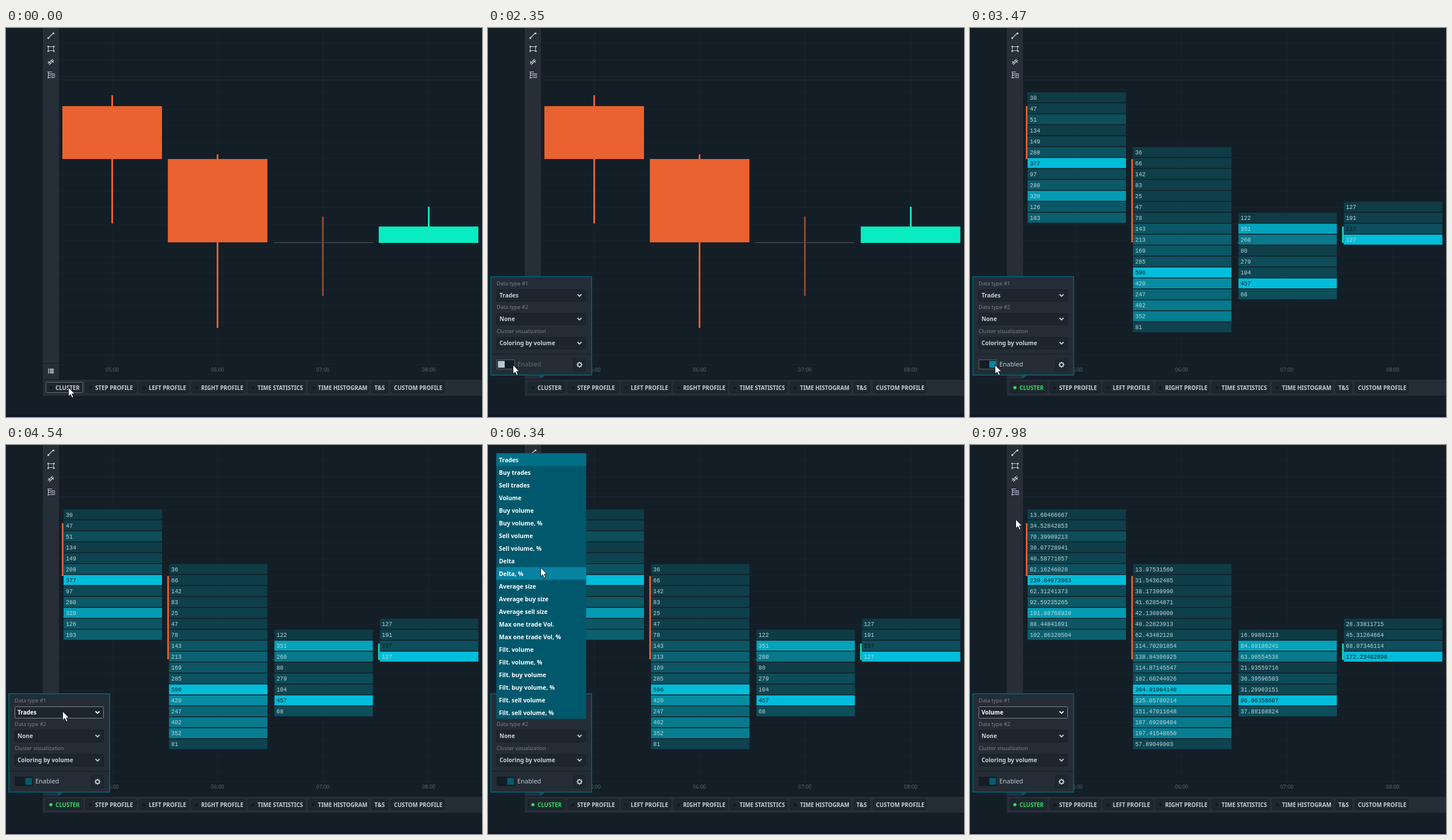
An HTML page with a canvas that plays this animation: 827x677 px, repeating every 8000 ms.

```html
<!DOCTYPE html>
<html lang="en">
<head>
<meta charset="utf-8">
<title>Cluster chart</title>
<style>
html, body { margin: 0; width: 100%; height: 100%; overflow: hidden; background: #141e27; }
canvas { display: block; }
</style>
</head>
<body>
<canvas id="stage" width="827" height="677"></canvas>
<script>
const ctx = document.getElementById('stage').getContext('2d');
const LOOP = 8000;
const STEP = 19.04;
const SANS = '"Noto Sans", "Open Sans", sans-serif';
const MONO = '10px "Liberation Mono", monospace';
const ORANGE = '#ea6230', TEAL = '#09ecc1';

// Rows start `first` steps below the top of the cluster grid.
const columns = [
  { x: 100, first: 0,
    trades: '30 47 51 134 149 208 377 97 280 320 126 103',
    volume: '13.60466667 34.52842853 70.39909213 30.07728941 48.58771057 82.16246028 230.84973063 62.31241373 92.59235265 191.08768920 88.44841091 102.86320504' },
  { x: 283.2, first: 5,
    trades: '36 66 142 83 25 47 78 143 213 169 285 596 420 247 402 352 81',
    volume: '13.97531560 31.54362485 38.17399990 41.62854871 42.13089000 40.22823913 62.43482128 114.70201854 138.84306925 114.87145547 102.60244926 304.01964140 225.05789214 151.47011648 187.69209404 197.41548650 57.89049003' },
  { x: 466.4, first: 11,
    trades: '122 351 260 80 279 104 457 68',
    volume: '16.99801213 84.69189241 63.90554538 21.93559716 36.39596503 31.29903151 96.06358697 37.88168824' },
  { x: 649.6, first: 10,
    trades: '127 191 237 127',
    volume: '28.33811715 45.31264664 68.07346114 172.23482890' }
].map(c => ({ ...c, trades: c.trades.split(' '), volume: c.volume.split(' ') }));

const candles = [
  { x: 98, top: 136, bottom: 228, high: 117, low: 340, color: ORANGE },
  { x: 281.2, top: 228, bottom: 373, high: 220, low: 522, color: ORANGE },
  { x: 464.4, top: 373, bottom: 374, high: 328, low: 466, color: '#565b5d', wick: '#8d4a30' },
  { x: 647.6, top: 345.5, bottom: 374, high: 311, low: 346, color: TEAL }
];

const buttons = [
  [69, 65, 'CLUSTER', 1], [138, 89, 'STEP PROFILE', 1], [231, 87, 'LEFT PROFILE', 1],
  [322, 94, 'RIGHT PROFILE', 1], [420, 100, 'TIME STATISTICS', 1], [525, 105, 'TIME HISTOGRAM', 1],
  [635, 29, 'T&S', 0], [669, 93, 'CUSTOM PROFILE', 0]
];

const options = ['Trades', 'Buy trades', 'Sell trades', 'Volume', 'Buy volume', 'Buy volume, %',
  'Sell volume', 'Sell volume, %', 'Delta', 'Delta, %', 'Average size', 'Average buy size',
  'Average sell size', 'Max one trade Vol.', 'Max one trade Vol, %', 'Filt. volume',
  'Filt. volume, %', 'Filt. buy volume', 'Filt. buy volume, %', 'Filt. sell volume',
  'Filt. sell volume, %'];

const easeBoth = p => p * p * (3 - 2 * p);
const easeIn = p => p ** 1.5;
const easeOut = p => 1 - (1 - p) ** 1.5;

// Pointer stops: time, x, y, easing on the way there.
const path = [
  [0, 108, 626], [915, 108, 626], [1620, 43, 586, easeBoth], [2349, 43, 586], [2350, 43, 587],
  [3510, 43, 587], [4190, 98, 455, easeBoth], [4270, 98, 455], [4540, 98, 464, easeBoth],
  [5780, 98, 464], [6340, 91, 215, easeIn], [6610, 85, 119, easeOut], [6640, 85, 119],
  [7120, 79, 92, easeBoth], [7890, 79, 92], [7980, 79, 130, easeBoth], [LOOP, 79, 130]
];

const ramp = (t, a, b) => Math.min(1, Math.max(0, (t - a) / (b - a)));
const mix = (a, b, p) => `rgb(${a.map((v, i) => Math.round(v + (b[i] - v) * p))})`;

function pointerAt(t) {
  const i = path.findIndex(k => k[0] > t);
  const [t0, x0, y0] = path[i - 1], [t1, x1, y1, ease = p => p] = path[i];
  const p = ease(ramp(t, t0, t1));
  return { x: Math.round(x0 + (x1 - x0) * p), y: Math.round(y0 + (y1 - y0) * p) };
}

function rect(x, y, w, h, color) {
  ctx.fillStyle = color;
  ctx.fillRect(x, y, w, h);
}

function frame(x, y, w, h, fill, border, line = 1, radius = 0) {
  ctx.beginPath();
  ctx.roundRect(x + line / 2, y + line / 2, w - line, h - line, radius);
  ctx.fillStyle = fill;
  ctx.fill();
  ctx.lineWidth = line;
  ctx.strokeStyle = border;
  ctx.stroke();
}

function label(str, x, y, color, font) {
  ctx.font = font;
  ctx.fillStyle = color;
  ctx.fillText(str, x, y);
}

const sans = (size, weight = 400) => `${weight} ${size}px ${SANS}`;

function stroke(d, color, width = 1) {
  ctx.strokeStyle = color;
  ctx.lineWidth = width;
  ctx.stroke(new Path2D(d));
}

function dot(x, y, r, color) {
  ctx.beginPath();
  ctx.arc(x, y, r, 0, 7);
  ctx.fillStyle = color;
  ctx.fill();
}

function drawGrid() {
  rect(0, 0, 827, 677, '#141e27');
  for (let k = 0; k < 20; k++) rect(92, Math.round(26.4 + 1.5 * STEP * k), 735, 1, '#19242c');
  rect(92, 90, 735, 1, '#1f2a33');
  rect(92, 585, 735, 1, '#19242c');
  ctx.textAlign = 'center';
  for (let k = 0; k < 4; k++) {
    const x = Math.round(184 + 183.2 * k);
    rect(x, 0, 1, 586, '#19242c');
    label(`0${5 + k}:00`, x + .5, 598, '#59656e', sans(9));
  }
  ctx.textAlign = 'left';
}

function drawSidebar() {
  const c = '#c0cbd4';
  rect(64, 0, 28, 611, '#262f38');
  rect(64, 583, 28, 1, '#141e27');
  stroke('M74 17L82 9', c, 1.2);
  rect(72, 16, 3, 3, c);
  rect(81, 8, 3, 3, c);
  stroke('M73.5 32.5H82.5V39.5H73.5Z', c);
  for (const x of [72, 82]) for (const y of [31, 39]) rect(x, y, 2.5, 2.5, c);
  stroke('M73 62L81 54M75 64L83 56M73 58l4 3M79 57l4 3', c, 1.2);
  stroke('M72 76.5H80M73.5 76V88M73 79.5H78M73 82.5H77M72 86.5H77', c);
  stroke('M78.5 79.5H84.5V86.5H78.5ZM80 82.5H83M81.5 80V86', '#b3a9d3');
  for (const y of [593, 596, 599]) {
    rect(73, y, 2, 2, c);
    rect(76, y, 7, 2, c);
  }
}

function drawCandles(clustered) {
  for (const { x, top, bottom, high, low, color, wick = color } of candles) {
    if (!clustered) rect(Math.round(x + 85), high, 3, low - high, wick);
    rect(x - (clustered ? 1 : 0), top, clustered ? 2.8 : 173, bottom - top, color);
  }
}

function drawClusters(key) {
  for (const col of columns) {
    const peak = Math.max(...col.volume), least = Math.min(...col.volume);
    const textPeak = Math.max(...col[key]);
    col.volume.forEach((v, i) => {
      const y = 112 + STEP * (col.first + i);
      const heat = ramp(v, least, peak) ** 1.45;
      rect(col.x, y, 171, 17.5, mix([15, 59, 69], [0, 189, 217], heat));
      const str = col[key][i];
      label(str, Math.round(col.x + 3.6), Math.round(y + 12.6),
        +str === textPeak ? '#0b1a20' : '#c3d3d9', MONO);
    });
  }
}

function drawButtons(t, p) {
  rect(64, 611, 763, 1, '#10181f');
  rect(64, 612, 763, 28, '#252e37');
  rect(0, 673, 827, 4, '#10172a');
  const green = ramp(t, 2600, 2960);
  buttons.forEach(([x, w, text, hasDot], i) => {
    const hover = p.y > 616 && p.y < 635 && p.x > x && p.x < x + w;
    const lit = i ? 0 : green;
    frame(x, 616, w, 19, '#1e272f', hover ? '#66717a' : '#151e26', 1, 2);
    if (hasDot) dot(x + 9, 626, 2.8, mix([18, 26, 33], [44, 222, 94], lit));
    label(text, x + (hasDot ? 17 : 5), 629.5, mix([195, 206, 215], [44, 222, 94], lit), sans(9.75, 700));
  });
}

function drawSelect(y, caption, value, active) {
  label(caption, 15, y - 7, '#7a838a', sans(9.15));
  frame(15, y, 155, 21, '#1d262f', active ? '#7d8890' : '#151e26', 1, 1);
  const c = active ? '#ffffff' : '#c6d0d8';
  label(value, 20, y + 14, c, sans(10, 600));
  stroke(`M155.5 ${y + 8.5}l3.5 3.5l3.5 -3.5`, c, 1.8);
}

function drawGear(x, y) {
  const c = '#c0cbd4';
  ctx.beginPath();
  ctx.arc(x, y, 3, 0, 7);
  ctx.lineWidth = 1.5;
  ctx.strokeStyle = c;
  ctx.stroke();
  for (let a = 0; a < 8; a++) {
    ctx.save();
    ctx.translate(x, y);
    ctx.rotate(a * Math.PI / 4);
    rect(-1, -5, 2, 2, c);
    ctx.restore();
  }
}

function drawPopup(t, p) {
  ctx.globalAlpha = ramp(t, 460, 790);
  ctx.fillStyle = '#05596a';
  ctx.fill(new Path2D('M87 604H99L93 610Z'));
  frame(4, 432, 177, 173, '#242d36', '#05596a', 2);
  rect(6, 567, 173, 1, '#161f27');
  drawSelect(455, 'Data type #1', t < 7100 ? 'Trades' : 'Volume', t > 4150);
  drawSelect(496, 'Data type #2', 'None');
  drawSelect(538, 'Cluster visualization', 'Coloring by volume');

  const hover = p.x < 95 && p.y > 576 && p.y < 594;
  const on = ramp(t, 2560, 2760);
  frame(15, 577, 32, 17, '#141d25', hover ? '#59656e' : '#172028');
  rect(17.3 + 16.2 * on, 579.5, 11.7, 11.7, mix([184, 198, 208], hover ? [8, 135, 161] : [4, 92, 110], on));
  label('Enabled', 51, 589, mix([98, 109, 117], [190, 201, 209], on), sans(10.9));
  frame(148, 575, 22, 22, '#1f2830', '#172028', 1, 1);
  drawGear(159, 586);
  ctx.globalAlpha = 1;
}

function drawOptions(t, p) {
  ctx.globalAlpha = ramp(t, 5000, 5300) * (1 - ramp(t, 7260, 7450));
  const top = 14.5, row = 22;
  const chosen = t < 7090 ? 0 : 3;
  const hovered = Math.floor((p.y - top) / row);
  rect(14.5, top, 156, row * options.length, '#00586c');
  options.forEach((text, i) => {
    const y = top + row * i;
    if (i === chosen) rect(14.5, y, 156, row, '#007088');
    else if (i === hovered) rect(14.5, y, 156, row, '#0782a0');
    label(text, 19, y + 15, '#ffffff', sans(10.3, 600));
  });
  ctx.globalAlpha = 1;
}

function drawPointer({ x, y }) {
  ctx.save();
  ctx.translate(x + .5, y - .5);
  const arrow = new Path2D('M0 0V15.5L3.6 12.2L6.2 18L8.7 16.9L6.2 11.3H11Z');
  ctx.fillStyle = '#fff';
  ctx.fill(arrow);
  ctx.lineWidth = 1;
  ctx.strokeStyle = '#10161c';
  ctx.stroke(arrow);
  ctx.restore();
}

function draw(t) {
  const p = pointerAt(t);
  drawGrid();
  drawCandles(t >= 2650);
  if (t >= 3465) drawClusters(t < 7480 ? 'trades' : 'volume');
  drawSidebar();
  drawButtons(t, p);
  if (t > 500) drawPopup(t, p);
  if (t > 5040 && t < 7450) drawOptions(t, p);
  drawPointer(p);
}

const start = performance.now();
function tick() {
  draw((performance.now() - start) % LOOP);
  requestAnimationFrame(tick);
}
tick();
</script>
</body>
</html>
```
